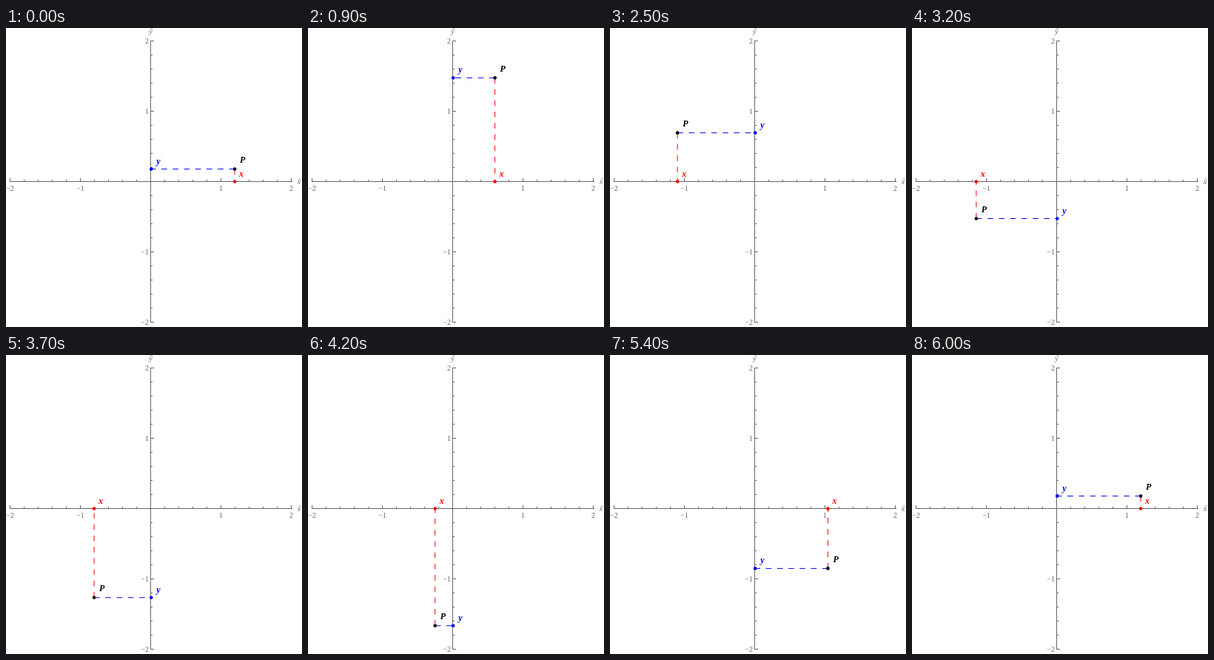
Animation, 400 px wide and 404 px high, one loop 6.1 s. Source, as an HTML page with a canvas:

```html
<!DOCTYPE html>
<html lang="en">
<head>
<meta charset="utf-8">
<title>Coordinates of a point on an ellipse</title>
<style>
  html, body { margin: 0; width: 100%; height: 100%; overflow: hidden; background: #fff; }
  canvas { display: block; }
</style>
</head>
<body>
<canvas id="stage" width="400" height="404"></canvas>
<script>
const ctx = document.getElementById('stage').getContext('2d');
const SERIF = '"Liberation Serif", Times, serif';
const GRAY = '#666';
const RED = '#f00', BLUE = '#00f', BLACK = '#000';
const ORIGIN = { x: 195.5, y: 207.5 };
const UNIT = 95.2;
const STEP_MS = 100, STEPS = 61, STEP_ANGLE = Math.PI / 30;
const DASH = 7.62;

const toX = u => ORIGIN.x + u * UNIT;
const toY = v => ORIGIN.y - v * UNIT;
const crisp = p => Math.floor(p) + 0.5;

function line(x1, y1, x2, y2, color, dash = []) {
  ctx.strokeStyle = color;
  ctx.lineWidth = 1;
  ctx.setLineDash(dash);
  ctx.beginPath();
  ctx.moveTo(x1, y1);
  ctx.lineTo(x2, y2);
  ctx.stroke();
}

function dot(x, y, color) {
  ctx.fillStyle = color;
  ctx.beginPath();
  ctx.arc(x, y, 2.3, 0, 2 * Math.PI);
  ctx.fill();
}

function text(str, x, y, color, font, align = 'left') {
  ctx.fillStyle = color;
  ctx.font = `${font} ${SERIF}`;
  ctx.textAlign = align;
  ctx.fillText(str, x, y);
}

function hatted(letter, x, y) {
  text(letter, x, y, GRAY, 'italic 10px', 'center');
  text('\u02c6', x + 0.5, y - 0.5, GRAY, 'italic 10px', 'center');
}

function drawAxes() {
  line(5, ORIGIN.y, 387, ORIGIN.y, GRAY);
  line(ORIGIN.x, 17, ORIGIN.x, 398, GRAY);
  for (let i = -10; i <= 10; i++) {
    if (i === 0) continue;
    const value = i / 5;
    const major = i % 5 === 0;
    const size = major ? 4.5 : 2.5;
    const x = crisp(toX(value)), y = crisp(toY(value));
    line(x, ORIGIN.y, x, ORIGIN.y - size, GRAY);
    line(ORIGIN.x, y, ORIGIN.x + size, y, GRAY);
    if (major) {
      const label = String(value).replace('-', '\u2212');
      text(label, x, 220, GRAY, '10px', 'center');
      text(label, 193, y + 3.5, GRAY, '10px', 'right');
    }
  }
  hatted('x', 396, 211);
  hatted('y', 195.5, 8);
}

function drawPoint(angle) {
  const x = toX(1.2 * Math.cos(angle));
  const y = toY(1.7 * Math.sin(angle));
  const axisX = ORIGIN.x + 0.7;
  const font = 'italic bold 12px';
  line(x, y, x, ORIGIN.y, RED, [DASH]);
  line(x, y, axisX, y, BLUE, [DASH]);
  dot(x, ORIGIN.y, RED);
  dot(axisX, y, BLUE);
  dot(x, y, BLACK);
  text('x', x + 6, ORIGIN.y - 6.5, RED, font);
  text('y', axisX + 7, y - 7, BLUE, font);
  text('P', x + 7, y - 8.5, BLACK, font);
}

function render() {
  const step = Math.floor(performance.now() / STEP_MS) % STEPS;
  ctx.fillStyle = '#fff';
  ctx.fillRect(0, 0, 400, 404);
  drawAxes();
  drawPoint((step + 1) * STEP_ANGLE);
  requestAnimationFrame(render);
}
render();
</script>
</body>
</html>
```
